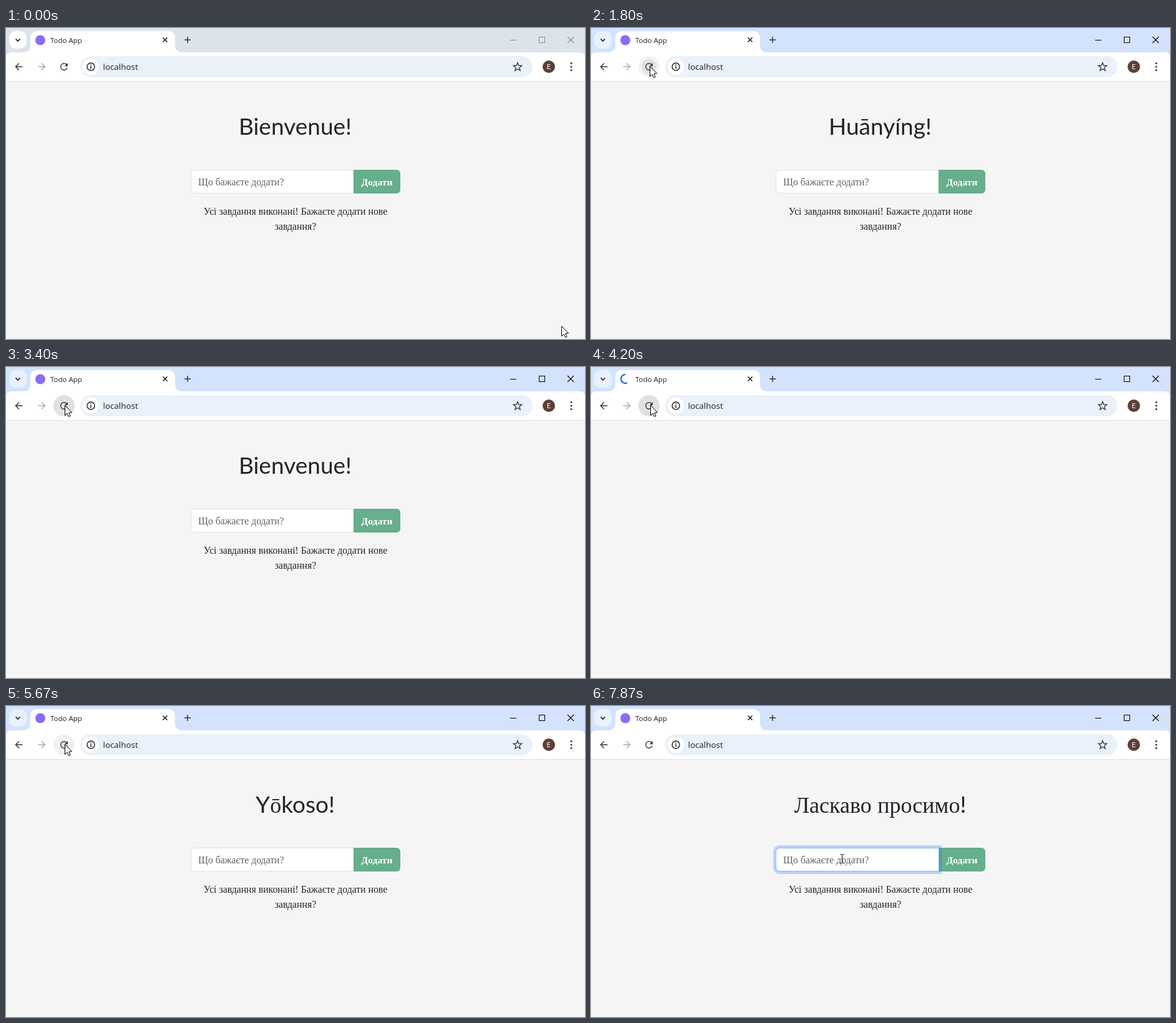
An HTML page with a canvas for the animation above (8 s loop, 928 by 498 pixels).

```html
<!DOCTYPE html>
<html lang="uk">
<head>
<meta charset="utf-8">
<title>Todo App</title>
<style>
html, body { margin: 0; width: 100%; height: 100%; overflow: hidden; background: #f5f5f5; }
canvas { display: block; width: 928px; height: 498px; }
</style>
</head>
<body>
<canvas id="stage" width="928" height="498"></canvas>
<script>
const ctx = document.getElementById('stage').getContext('2d');
const LOOP = 8000;
const INK = '#212529';
const SERIF = '"Liberation Serif", serif';
const UI = '"Open Sans", sans-serif';
const SANS_HEAD = '37px Lato, sans-serif';
const SERIF_HEAD = '36px ' + SERIF;

// Greetings as runs of [text, font]
const FRENCH = [['Bienvenue!', SANS_HEAD]];
const CHINESE = [['Huānyíng!', SANS_HEAD]];
const JAPANESE = [['Y', SANS_HEAD], ['ō', SERIF_HEAD], ['koso!', SANS_HEAD]];
const UKRAINIAN = [['Ласкаво', SERIF_HEAD], [' ', SANS_HEAD], ['просимо', SERIF_HEAD], ['!', SANS_HEAD]];

// Page loads: when the greeting appears, spinner time and blank time before it
const loads = [
  { at: 0, greeting: FRENCH },
  { at: 1130, greeting: CHINESE },
  { at: 2000, greeting: FRENCH, spin: 130 },
  { at: 2940, greeting: FRENCH, spin: 140, blank: 70 },
  { at: 3600, greeting: UKRAINIAN, spin: 130 },
  { at: 4270, greeting: JAPANESE, spin: 130, blank: 70 },
  { at: 5070, greeting: UKRAINIAN, spin: 130 },
  { at: 5470, greeting: JAPANESE, spin: 70 },
  { at: 5870, greeting: FRENCH },
  { at: 6470, greeting: UKRAINIAN, spin: 130 }
];

// Reload button: [press, fade start]
const presses = [
  [1730, 2000], [2600, 2950], [3270, 3500], [4070, 4300],
  [4670, 5000], [5200, 5330], [5670, 5930], [6270, 6750]
];

// Pointer: [time, x, y]
const pointerKeys = [
  [0, 890, 477], [60, 890, 477], [670, 94, 61], [3900, 94, 61],
  [4100, 95, 61], [5200, 95, 61], [5400, 94, 61], [6690, 94, 61],
  [7070, 402, 244]
];

const reloadIcon = new Path2D('M17.65 6.35A8 8 0 1 0 19.73 14h-2.08A6 6 0 1 1 12 6c1.66 0 3.14.69 4.22 1.78L13 11h7V4z');

const clamp = v => Math.max(0, Math.min(1, v));
const progress = (t, from, length) => clamp((t - from) / length);
const smooth = p => p * p * (3 - 2 * p);

function rect(x, y, w, h, color, radius = 0) {
  ctx.fillStyle = color;
  ctx.beginPath();
  ctx.roundRect(x, y, w, h, radius);
  ctx.fill();
}

function disc(x, y, r, color) {
  ctx.fillStyle = color;
  ctx.beginPath();
  ctx.arc(x, y, r, 0, Math.PI * 2);
  ctx.fill();
}

function arc(x, y, r, from, to, color, width) {
  ctx.strokeStyle = color;
  ctx.lineWidth = width;
  ctx.beginPath();
  ctx.arc(x, y, r, from, to);
  ctx.stroke();
}

function trace(points) {
  ctx.beginPath();
  for (let i = 0; i < points.length; i += 2) ctx.lineTo(points[i], points[i + 1]);
}

function line(points, color, width = 1) {
  ctx.strokeStyle = color;
  ctx.lineWidth = width;
  trace(points);
  ctx.stroke();
}

function cross(x, y, r, color, width) {
  line([x - r, y - r, x + r, y + r], color, width);
  line([x + r, y - r, x - r, y + r], color, width);
}

function text(str, x, y, font, color, align = 'left') {
  ctx.font = font;
  ctx.fillStyle = color;
  ctx.textAlign = align;
  ctx.fillText(str, x, y);
}

function drawTabs(active, spinning, t) {
  rect(0, 0, 928, 50, active ? '#d3e3fd' : '#dde3ea');
  rect(5, 5, 28, 28, active ? '#e9f1fe' : '#ffffff', 10);
  line([15.5, 17.5, 19, 21, 22.5, 17.5], '#1f1f1f', 1.7);

  ctx.fillStyle = '#ffffff';
  ctx.beginPath();
  ctx.moveTo(29, 39);
  ctx.arcTo(39, 39, 39, 29, 10);
  ctx.arcTo(39, 5, 49, 5, 10);
  ctx.arcTo(271, 5, 271, 15, 10);
  ctx.arcTo(271, 39, 281, 39, 10);
  ctx.fill();

  if (spinning) {
    const turn = t / 160;
    arc(55, 19, 7, turn, turn + 3.6, '#0b57d0', 2);
  } else {
    disc(55, 19.5, 8, '#8b6cf6');
  }
  text('Todo App', 71, 24, '11.5px ' + UI, '#1f1f1f');
  cross(255, 19, 3.5, '#1f1f1f', 1.6);
  line([286, 19, 296, 19], '#3c4043', 1.6);
  line([291, 14, 291, 24], '#3c4043', 1.6);

  const control = active ? '#000000' : '#8a8d92';
  line([808, 19.5, 818, 19.5], control);
  ctx.strokeRect(854.5, 14.5, 9, 9);
  cross(905, 19, 5, control, 1.1);
}

function drawArrow(x, direction, color) {
  const tip = x + 5.5 * direction;
  line([x - 5.5 * direction, 62, tip, 62], color, 1.6);
  line([x, 56.5, tip, 62, x, 67.5], color, 1.6);
}

function drawReload(t) {
  ctx.globalAlpha = t < 1000 ? 0 : 1 - progress(t, 6750, 200);
  disc(93, 62, 17, '#f1f2f1');
  for (const [down, fade] of presses) {
    if (t < down) continue;
    ctx.globalAlpha = 1 - progress(t, fade, 200);
    disc(93, 62, 6 + 11 * progress(t, down, 130), '#e1e1e1');
  }
  ctx.globalAlpha = 1;
  ctx.save();
  ctx.translate(93, 62);
  ctx.scale(0.75, 0.75);
  ctx.translate(-12, -12);
  ctx.fillStyle = '#3c4043';
  ctx.fill(reloadIcon);
  ctx.restore();
}

function drawStar(x, y) {
  const points = [];
  for (let i = 0; i < 10; i++) {
    const r = i % 2 ? 3 : 7;
    const angle = i * Math.PI / 5 - Math.PI / 2;
    points.push(x + r * Math.cos(angle), y + r * Math.sin(angle));
  }
  trace(points);
  ctx.closePath();
  ctx.strokeStyle = '#3c4043';
  ctx.lineWidth = 1.4;
  ctx.stroke();
}

function drawToolbar(t) {
  rect(0, 39, 928, 46, '#ffffff', [8, 8, 0, 0]);
  rect(0, 85, 928, 1, '#dfe1e3');
  drawArrow(21, -1, '#3c4043');
  drawArrow(57, 1, '#aeb0b2');
  drawReload(t);

  rect(119, 45, 725, 34, '#eaf1fa', 17);
  disc(136, 62, 13, '#ffffff');
  arc(136, 62, 6, 0, Math.PI * 2, '#1f1f1f', 1.4);
  rect(135.3, 61, 1.5, 4.5, '#1f1f1f');
  rect(135.3, 58.3, 1.5, 1.6, '#1f1f1f');
  text('localhost', 155.5, 67, '13.4px ' + UI, '#1f1f1f');
  drawStar(820, 62.5);

  disc(870, 62, 10, '#5d4037');
  text('E', 870, 66, '11px Roboto, sans-serif', '#ffffff', 'center');
  for (const y of [56.5, 62, 67.5]) disc(906, y, 1.6, '#3c4043');
}

function drawHeading(runs) {
  const widths = runs.map(([str, font]) => {
    ctx.font = font;
    return ctx.measureText(str).width;
  });
  let x = 463.5 - widths.reduce((a, b) => a + b, 0) / 2;
  runs.forEach(([str, font], i) => {
    text(str, x, 171, font, INK);
    x += widths[i];
  });
}

function drawForm(t) {
  const body = '15.75px ' + SERIF;
  const focus = progress(t, 7120, 200);

  rect(557, 227, 75, 38, '#66ae8c', [0, 6, 6, 0]);
  text('Додати', 594.5, 252, 'bold 15.6px ' + SERIF, '#ffffff', 'center');

  rect(296, 227, 262, 38, '#dee2e6', [6, 0, 0, 6]);
  ctx.globalAlpha = focus;
  rect(296, 227, 262, 38, '#86b7fe', [6, 0, 0, 6]);
  ctx.globalAlpha = 1;
  rect(297, 228, focus ? 260 : 261, 36, '#ffffff', [5, 0, 0, 5]);
  if (!focus) rect(557, 227, 1, 38, '#66ae8c');

  const spread = 4 * focus;
  ctx.fillStyle = `rgba(13, 110, 253, ${0.25 * focus})`;
  ctx.beginPath();
  ctx.roundRect(296 - spread, 227 - spread, 262 + 2 * spread, 38 + 2 * spread, [6 + spread, 0, 0, 6 + spread]);
  ctx.roundRect(296, 227, 262, 38, [6, 0, 0, 6]);
  ctx.fill('evenodd');

  text('Що бажаєте додати?', 308, 252, body, '#5f6366');
  if (t >= 7340 && t < 7870) rect(309, 237, 1, 19, INK);

  text('Усі завдання виконані! Бажаєте додати нове', 464, 299, body, INK, 'center');
  text('завдання?', 464, 323, body, INK, 'center');
}

function pointerAt(t) {
  const i = pointerKeys.findIndex(key => key[0] > t);
  if (i < 0) return pointerKeys.at(-1).slice(1);
  const [t0, x0, y0] = pointerKeys[i - 1];
  const [t1, x1, y1] = pointerKeys[i];
  const p = smooth((t - t0) / (t1 - t0));
  return [Math.round(x0 + (x1 - x0) * p), Math.round(y0 + (y1 - y0) * p)];
}

function drawPointer(t) {
  const [x, y] = pointerAt(t);
  ctx.save();
  ctx.translate(x + 0.5, y + 0.5);
  if (x > 296 && x < 557 && y > 227 && y < 265) {
    line([0, -7, 0, 7], '#000000');
    for (const end of [-7, 7]) {
      line([-3, end, -1, end], '#000000');
      line([1, end, 3, end], '#000000');
    }
  } else {
    trace([0, 0, 0, 16, 3.6, 12.7, 6, 18, 8.6, 17, 6.3, 11.7, 11, 11.3]);
    ctx.closePath();
    ctx.fillStyle = '#ffffff';
    ctx.fill();
    ctx.strokeStyle = '#000000';
    ctx.lineWidth = 1;
    ctx.stroke();
  }
  ctx.restore();
}

function draw(t) {
  const current = loads.findLast(load => load.at <= t);
  const upcoming = loads.find(load => load.at > t);
  const within = key => Boolean(upcoming && t >= upcoming.at - (upcoming[key] || 0));

  rect(0, 0, 928, 498, '#f5f5f5');
  drawTabs(t >= 1000, within('spin'), t);
  drawToolbar(t);
  if (!within('blank')) {
    drawHeading(current.greeting);
    drawForm(t);
  }
  drawPointer(t);
}

const start = performance.now();
function tick() {
  draw((performance.now() - start) % LOOP);
  requestAnimationFrame(tick);
}
tick();
</script>
</body>
</html>
```
